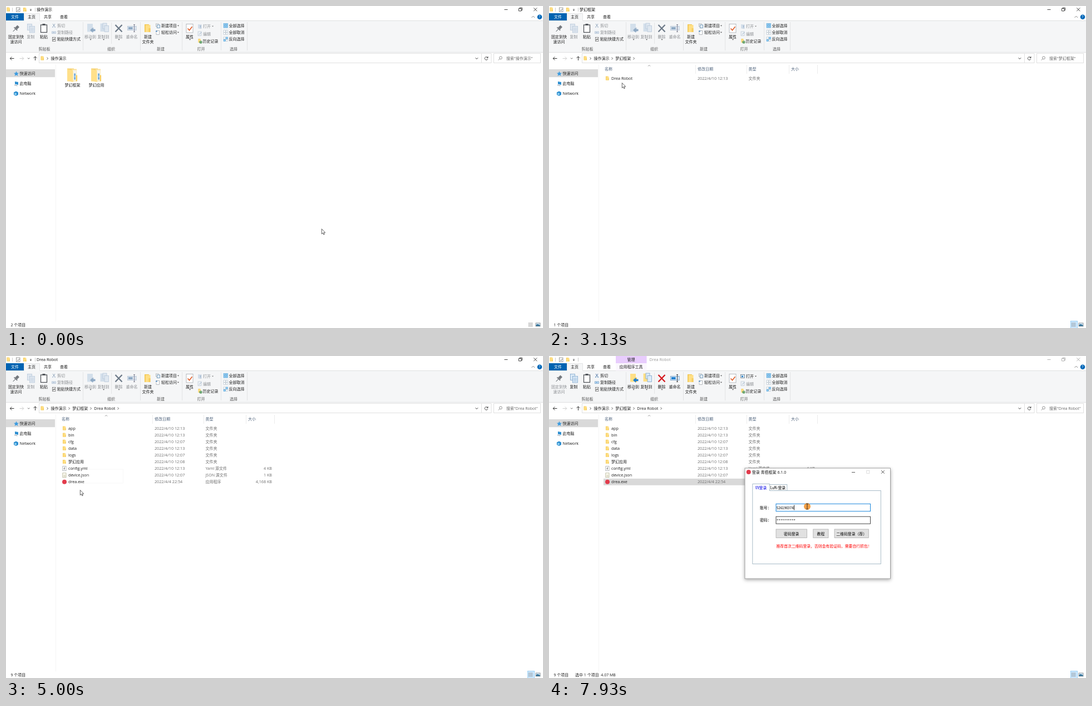
An HTML page that plays this animation: 965 px wide and 580 px high, repeating every 8000 ms.

```html
<!DOCTYPE html>
<html lang="en">
<head>
<meta charset="utf-8">
<title>File manager demo</title>
<style>
html, body { margin: 0; width: 100%; height: 100%; overflow: hidden; background: #fff; }
svg { display: block; width: 100%; height: 100%; }
text { font-family: "Open Sans", "Noto Sans CJK SC", "Noto Sans CJK", sans-serif; white-space: pre; }
.mono { font-family: "Noto Sans Mono CJK SC", "Noto Sans CJK SC", "Noto Sans CJK", monospace; }
</style>
</head>
<body>
<svg id="stage" viewBox="0 0 965 580" xmlns="http://www.w3.org/2000/svg"></svg>
<script>
const LOOP = 8000, STEP = 1000 / 15;
const INK = '#1e1e1e', DIM = '#8b8e92', GREY = '#6d6d6d', BLUE = '#2f7fc0';

// ---- drawing helpers ----
const text = (x, y, s, c = INK, anchor = 'start', size = /[\u4e00-\u9fff]/.test(s) ? 7 : 7.2, cls = '') =>
  `<text x="${x}" y="${y + 2.6}" fill="${c}" text-anchor="${anchor}" font-size="${size}" class="${cls}">${s}</text>`;
const mid = (x, y, s, c) => text(x, y, s, c, 'middle');
const mono = (x, y, s, c = '#000', anchor = 'start') => text(x, y, s, c, anchor, 6.85, 'mono');
const box = (x, y, w, h, fill, stroke = 'none', sw = 1) =>
  `<rect x="${x}" y="${y}" width="${w}" height="${h}" fill="${fill}" stroke="${stroke}" stroke-width="${sw}"/>`;
const line = (d, c, w = 1, fill = 'none') => `<path d="${d}" stroke="${c}" stroke-width="${w}" fill="${fill}"/>`;
const shape = (d, c) => `<path d="${d}" fill="${c}"/>`;
const dot = (x, y, r, c) => `<circle cx="${x}" cy="${y}" r="${r}" fill="${c}"/>`;
const down = (x, y, c = '#444') => shape(`M${x - 1.5} ${y - .8}h3l-1.5 1.8z`, c);
const chev = (x, y, c = '#444') => line(`M${x - 1} ${y - 2}l2 2l-2 2`, c, .9);
const folder = (x, y, w = 5.5, h = 7) =>
  box(x, y, w * .75, h, '#f2c54b') + box(x + w * .15, y + h * .08, w * .85, h * .92, '#ffdf85') +
  box(x + w * .7, y + h * .5, w * .3, h * .5, '#f5cd62');
const page = (x, y, w, h, c = '#9aa0a6', fill = '#fff') => box(x, y, w, h, fill, c, .7);

function bigFolder(x, y) {
  return shape(`M${x} ${y}h12v23h-12z`, '#f6d272') + shape(`M${x + 8} ${y + 1}h9v22h-9z`, '#fbe199') +
    box(x + 10, y + 3, 6.5, 19, '#f4f4ee') + box(x + 12.3, y + 9, 2.6, 11, '#6ba6d6') +
    box(x + 12.3, y + 13, 2.6, 3, '#a4cdea') + shape(`M${x} ${y + 1}l10.5 3v20.5l-10.5 -2z`, '#ffe08a') +
    box(x + 15.8, y + 12, 2.2, 11, '#f3ca5c');
}

// ---- ribbon: on = something selected, exe = application selected ----
function ribbon(on, exe) {
  const c = on ? INK : DIM, pin = exe ? DIM : INK;
  const pale = on ? '#dcebf8' : '#dfe7f0', edge = on ? '#6f9cc6' : '#b3c4d6', arrow = on ? '#1e7fd0' : '#8ea9c4';
  let s = '';
  // clipboard
  s += `<g transform="translate(18 40.5) rotate(45)">` + box(-2.5, -6, 5, 6, '#74797e') + box(-4, 0, 8, 1.8, '#74797e') +
    line('M0 1V7.5', '#74797e', 1) + '</g>';
  s += mid(18, 55.5, '固定到快', pin) + mid(18, 64.5, '速访问', pin);
  s += page(38.5, 32.5, 8, 11, edge, pale) + page(42.5, 36.5, 9, 11.5, edge, pale) +
    line('M44 40h6M44 42.5h6M44 45h6', edge, .6) + mid(44.5, 55.5, '复制', c);
  s += box(62.5, 34, 11, 13.5, '#fff', '#4f5358', 1.3) + box(65.5, 32, 5, 3, '#4f5358') + mid(68, 55.5, '粘贴');
  s += line('M84 32l3.5 5M88 32l-3.5 5', on ? '#4a6fa0' : '#8ba0b8', .9) + dot(84, 38, 1.1, edge) + dot(88, 38, 1.1, edge);
  s += text(92, 35.5, '剪切', c);
  s += box(82.5, 46, 7, 3.5, pale, edge, .8) + line('M84 47.7h3.5', arrow, .8) + text(92, 47.5, '复制路径', c);
  s += page(83.5, 56.5, 5.5, 7, '#555') + line('M85 62v-2.2h2.5M86.3 58.3l1.5 1.5l-1.5 1.5', '#333', .8) + text(92, 59.5, '粘贴快捷方式');
  // organise
  const fill = on ? '#ffdf85' : '#d3dfeb';
  s += box(146, 32, 10, 14.5, fill) + box(155, 39, 3, 8, on ? '#f2c54b' : '#c3d2e2');
  s += shape('M151 43.5l5-4.5v2.7h4.5v3.6h-4.5v2.7z', arrow) + mid(151.5, 55.5, '移动到', c) + down(152, 60.5);
  s += box(169.5, 31.5, 9, 14.5, fill) + page(174, 31, 7, 10, edge, pale) + page(177, 35.5, 7.5, 11, edge, pale) +
    mid(175, 55.5, '复制到', c) + down(175.5, 60.5);
  s += line('M196.5 34l12 12.5M208.5 34l-12 12.5', on ? '#d4161c' : '#6d7a88', 2.3) + mid(202.5, 55.5, '删除', c) + down(203, 60.5);
  s += box(218.5, 36.5, 15.5, 7, pale, edge, .9) + box(220, 38, 7.5, 4, arrow) +
    line('M229 33.5h3M230.5 33.5v13M229 46.5h3', on ? '#333' : '#778', .9) + mid(226, 55.5, '重命名', c);
  // new
  s += folder(249, 33, 10.5, 14) + mid(255, 55.5, '新建') + mid(255, 64.5, '文件夹');
  s += page(269.5, 32, 4.5, 5) + page(271.5, 34, 5, 5.5, '#4f7fa8', '#e5f0f8') + text(279, 35.5, '新建项目') + down(309.5, 35.5);
  s += page(270, 44.5, 5.5, 7) + line('M269 45.5h3', BLUE, 1.2) + text(279, 47.5, '轻松访问') + down(309.5, 47.5);
  // open
  s += page(324, 32.5, 12, 15.5) + line('M326.5 40.5l3 3.2l5-6.5', '#e0622f', 1.7) + mid(330, 55.5, '属性') + down(330.5, 60.5);
  s += exe ? box(344.5, 33.5, 7, 6, '#dff0fb', '#6a7b88', .8) + box(346, 35.5, 3, 2.6, BLUE)
    : box(345, 33, 2.5, 7.5, fill) + page(348, 34, 3, 6.5, edge, pale) + line('M349.5 39v-4', arrow, .9);
  s += text(354, 36.5, '打开', c) + down(371.5, 36.5, on ? '#444' : '#777');
  s += page(345, 46, 6, 7.5, '#b7c5d3', '#eef2f6') + line('M347 51.5l4.5-4.5', '#9fb2c6', 1) + text(354, 50, '编辑', DIM);
  s += folder(345.5, 59, 4.5, 7) + dot(350, 65, 2.6, '#5a9a5f') + line('M350 63.5v1.6h1.3', '#fff', .6) + text(353.5, 63, '历史记录');
  // select
  const grid = (y, cols) => cols.map((f, i) => box(391 + i % 2 * 4.2, y + (i >> 1) * 4.2, 3.4, 3.4, f, f === '#fff' ? '#a9b7c4' : '#58a6dc', .6)).join('');
  const a = '#8cc8ee', w = '#fff';
  s += grid(31.5, [a, a, a, a]) + grid(43.7, [w, w, w, w]) + grid(56, [w, a, a, w]);
  s += text(400.5, 35.5, '全部选择') + text(400.5, 47.5, '全部取消') + text(400.5, 59.5, '反向选择');
  if (exe) s += box(120, 0, 55.5, 13, '#e8ccfd') + box(120, 13, 55.5, 13.5, '#fbf7fe') + mid(147.5, 6.3, '管理') + mid(147.5, 19.7, '应用程序工具');
  return s;
}

function frame() {
  let s = box(0, 0, 965, 580, '#fff') + box(0, 27, 965, 56.5, '#f5f6f7');
  s += line('M0 26.5H32.5M60.5 26.5H965M0 83.5H965', '#dfe0e1') + line('M32.5 26.5V13.5H60.5V26.5', '#e4e5e6', 1, '#f5f6f7');
  s += folder(1.5, 2.5) + line('M11.5 3v7M52.5 3v7', '#b5b5b5', .7);
  s += page(18.5, 3, 6.5, 7.5, '#777') + line('M20 7l1.6 1.7l2.6-3.7', '#555', .8) + folder(31, 3) + line('M43 6h3', '#333', .7) + down(44.5, 8, '#333');
  s += box(0, 13, 32, 13, '#0063b1') + mid(16, 19.7, '文件', '#fff') + mid(46, 19.7, '主页') + mid(75, 19.7, '共享') + mid(104, 19.7, '查看');
  s += line('M944.5 21l2.8-2.8l2.8 2.8', '#666', .8) + dot(959, 19.7, 4.3, '#0067b8') + text(959, 19.7, '?', '#fff', 'middle', 6.5);
  s += line('M138.5 29v51M241.5 29v51M316.5 29v51M386.5 29v51M433.5 29v51M189.5 30v38', '#e3e4e5');
  [[69, '剪贴板'], [189, '组织'], [278, '新建'], [350.5, '打开'], [409, '选择']].forEach(([x, t]) => s += mid(x, 77.3, t, '#555'));
  // address bar
  s += line('M14.5 94.5h-7M10.3 91.5l-3 3l3 3', '#333', 1) + line('M24.5 94.5h7M28.8 91.5l3 3l-3 3', '#c9c9c9', .9);
  s += line('M39 93.5l1.7 1.7l1.7-1.7', '#555', .9) + line('M52.5 98v-7M49.6 93.8l2.9-2.9l2.9 2.9', '#333', 1);
  s += box(59.5, 85.5, 812.5, 17, '#fff', '#e0e0e0') + line('M854.5 86v16', '#e0e0e0') + box(876.5, 85.5, 84, 17, '#fff', '#e0e0e0');
  s += folder(62.5, 90.5) + chev(74.5, 94.5) + line('M843.7 93.3l2.2 2.2l2.2-2.2', '#333', 1);
  s += line('M865.6 93a2.8 2.8 0 1 0 .2 2.4M866 91v2.4h-2.4', '#333', .9);
  s += `<circle cx="889" cy="93.3" r="2.4" fill="none" stroke="#777" stroke-width=".8"/>` + line('M887.2 95.2l-2.4 2.4', '#777', .9);
  // navigation pane
  s += box(0, 114, 88, 14.2, '#d9d9d9') + line('M89.5 105v463', '#f5f5f5');
  s += shape('M18.5 117.5l1.3 2.9l3.2.3l-2.4 2.1l.8 3.2l-2.9-1.7l-2.9 1.7l.8-3.2l-2.4-2.1l3.2-.3z', '#3b9be0');
  s += shape('M16 136l6 1v5l-6-1.3z', '#2f8fd0') + line('M15 142.3l5.5 1.4', '#8a97a3', 1);
  s += shape('M14 155.5l4-2l4 2v4.5l-4 2l-4-2z', '#2f8fd0') + dot(17, 158.5, 2, '#8fd0f2');
  s += text(24.5, 121.5, '快速访问') + text(24.5, 139.7, '此电脑') + text(24.5, 157.7, 'Network');
  return s;
}
const viewIcons = () => [571, 573, 575, 577].map(y => line(`M939 ${y}h2.2M942 ${y}h1.8M944.5 ${y}h1.8`, '#777', .8)).join('') +
  box(952, 571, 8, 6, '#cfe6f7', '#777', .7) + shape('M952.4 576.6v-2l3-1.5l4.3 2v1.5z', '#2d6d93');

// ---- folder contents ----
const rowY = i => 130.2 + 12.08 * i;
const day = '2022/4/10 12:';
const FILES = [['app', day + '13'], ['bin', day + '13'], ['cfg', day + '07'], ['data', day + '13'], ['logs', day + '07'], ['梦幻应用', day + '08'],
  ['config.yml', day + '13', 'Yaml 源文件', '4 KB'], ['device.json', day + '07', 'JSON 源文件', '1 KB'], ['drea.exe', '2022/4/4 22:54', '应用程序', '4,168 KB']];

function fileIcon(name, y) {
  if (name.endsWith('.exe')) return dot(105, y, 4, '#e23b4c');
  if (name.endsWith('.yml')) return page(101.8, y - 4, 6.2, 8) + line(`M106 ${y - 2}q-1.3-.4-1.3 1v3.2M103.8 ${y}h2`, '#555', .7);
  if (name.endsWith('.json')) return page(101.8, y - 4, 6.2, 8, '#aaa88a', '#fbfaf0') + line(`M103.3 ${y}h3.5M103.3 ${y + 2}h3.5`, '#b5b48f', .7);
  return folder(102, y - 3.6);
}
function details(files) {
  const hc = '#4c607a';
  let s = line('M263.5 106v16M355.5 106v16M431.5 106v16M482.5 106v16', '#ececec') + line('M177.8 108.5l2.2-2l2.2 2', '#777', .7);
  s += text(100, 113.5, '名称', hc) + text(267, 113.5, '修改日期', hc) + text(358.5, 113.5, '类型', hc) + text(435, 113.5, '大小', hc);
  files.forEach(([name, date, type = '文件夹', size = ''], i) => {
    const y = rowY(i);
    s += fileIcon(name, y) + text(112, y, name) + text(267, y, date, GREY) + text(358.5, y, type, GREY) + text(478, y, size, GREY, 'end');
  });
  return s;
}
const VIEWS = [
  { title: '操作演示', count: 2, body: bigFolder(110, 112.5) + bigFolder(153, 112.5) + mid(119.5, 142, '梦幻框架') + mid(162.5, 142, '梦幻应用') },
  { title: '梦幻框架', count: 1, body: details([['Drea Robot', day + '13']]) },
  { title: 'Drea Robot', count: 9, body: details(FILES) }
];
const CRUMBS = [80.5, 119.3, 158.3], CHEVS = [113.5, 152.5, 201.5];
const crumbs = n => VIEWS.slice(0, n + 1).map((v, i) => text(CRUMBS[i], 94.3, v.title) + (i < n ? chev(CHEVS[i], 94.5) : '')).join('') +
  text(899, 94.3, `搜索"${VIEWS[n].title}"`, '#666');

function dialog() {
  let s = `<rect x="352" y="202" width="261.5" height="199" fill="#fff" stroke="#8a8a8a" stroke-width=".8" filter="url(#shade)"/>`;
  s += dot(358.7, 209, 4, '#e23b4c') + text(364.8, 209, '登录 青梧框架 6.1.0', '#111');
  s += line('M544 209.5h6', '#333', .8) + box(570.8, 206.3, 5, 5, 'none', '#ccc', .7) + line('M597 206l5.8 5.8M602.8 206l-5.8 5.8', '#333', .8);
  s += box(365.8, 242.5, 230.5, 132, '#fff', '#9fb4c2', .9) + box(396.5, 231.5, 31.3, 11, '#fff', '#9fb4c2', .9);
  s += line('M365.8 243V230.3H396.5V243', '#9fb4c2', .9, '#fff') + line('M366.3 242.6H396', '#fff', 1.4);
  s += mono(381, 237, 'VV登录', '#0000e6', 'middle') + mono(411.5, 237.2, 'LuMi登录', '#000', 'middle');
  s += mono(379, 273, '账号：') + mono(379, 295.8, '密码：');
  s += box(408, 266.3, 169.5, 13.4, '#fff', '#0078d7', .9) + `<g id="pass">${box(408, 289.2, 169.5, 13, '#fff')}</g>`;
  s += mono(408.8, 273, '526190374') + mono(408.8, 296, '**********');
  [[408, 55.5, '密码登录'], [474.8, 27.2, '教程'], [513, 61.3, '二维码登录（荐）']].forEach(([x, w, t]) =>
    s += box(x, 312, w, 15.5, '#e1e1e1', '#adadad', .8) + mono(x + w / 2, 320.3, t, '#000', 'middle'));
  return s + mono(408.5, 342.5, '推荐首次二维码登录，否则会有验证码，需要自行抓包!', '#f00');
}

// ---- build ----
const group = (id, s) => `<g id="${id}">${s}</g>`;
const stage = document.getElementById('stage');
stage.innerHTML = '<defs><filter id="shade" x="-10%" y="-10%" width="120%" height="125%"><feDropShadow dx="0" dy="2" stdDeviation="3" flood-opacity=".35"/></filter></defs>' +
  frame() + group('rib0', ribbon(false, false)) + group('rib1', ribbon(true, false)) + group('rib2', ribbon(true, true)) +
  group('controls', line('M895.5 6.5h6M921.5 4.5h4.5v4.5h-4.5zM923 4.5v-1.3h4.5v4.5h-1.5M948.3 3.3l6 6M954.3 3.3l-6 6', 'currentColor', .9)) +
  group('title', text(0, 6.5, '')) + group('status', text(8.5, 574.2, '')) + group('picked', text(47, 574.2, '')) +
  group('listOn', box(937.5, 567.5, 12, 13, '#cce8ff', '#8cc6ee', .8)) + viewIcons() +
  '<rect id="hover"/><rect id="sel"/>' +
  VIEWS.map((v, i) => group('view' + i, v.body + crumbs(i))).join('') + group('tail', chev(0, 94.5)) +
  group('tip', box(135, 204, 75.5, 25, '#fff', '#888', .8)) +
  group('dialog', dialog() + '<rect id="caret" y="268.5" width=".9" height="9" fill="#000"/>') +
  '<circle id="ring" fill="#ef8718"/>' +
  group('arrow', line('M.3 .5V9.6L2.4 7.7L3.8 10.9L5.3 10.2L3.9 7.2H6.7Z', '#222', .7, '#fff')) +
  group('beam', line('M-2-5h1.5l.5 .5l.5-.5h1.5M0-4.5v9M-2 5h1.5l.5-.5l.5 .5h1.5', '#222', .9));
const el = {};
stage.querySelectorAll('[id]').forEach(e => el[e.id] = e);

// ---- timeline, in steps of 1/15 s ----
const PATH = [[0, 567, 401], [9, 567, 401], [22, 114, 149], [25, 114, 123], [35, 114, 123], [41, 129, 148], [47, 131, 138], [50, 133, 132],
  [62, 133, 132], [66, 133, 164], [69, 133, 187], [72, 133, 187], [75, 133, 241], [79, 133, 254], [80, 133, 254], [86, 133, 227], [94, 133, 227],
  [99, 183, 267], [102, 183, 267], [106, 300, 92], [111, 468, 316], [115, 464, 271], [120, 464, 271]];
const CLICKS = [28, 31, 52, 55, 88, 91, 116];
const NAV = [0, 34, 58], PICK = [28, 52, 88], OPEN = 95;

function cursorAt(f) {
  let i = 1;
  while (i < PATH.length - 1 && PATH[i][0] < f) i++;
  const [f0, x0, y0] = PATH[i - 1], [f1, x1, y1] = PATH[i];
  const p = Math.min(1, (f - f0) / (f1 - f0)), e = (1 - Math.cos(Math.PI * p)) / 2;
  return [x0 + (x1 - x0) * e, y0 + (y1 - y0) * e];
}
const show = (e, on) => e.setAttribute('display', on ? 'inline' : 'none');
const set = (e, o) => { for (const k in o) e.setAttribute(k, o[k]); };
const write = (e, s) => { if (e.firstChild.textContent !== s) e.firstChild.textContent = s; };
const cell = (view, i) => view === 0 ? { x: 98, y: 109, width: 42.5, height: 39.5 } : { x: 98, y: rowY(i) - 6, width: 382.5, height: 12 };

function draw(t) {
  const f = Math.floor((t + 4) / STEP);
  const [x, y] = cursorAt(f);
  const view = f >= NAV[2] ? 2 : f >= NAV[1] ? 1 : 0;
  const picked = f >= PICK[view], open = f >= OPEN, exe = picked && view === 2;

  [0, 1, 2].forEach(i => {
    show(el['view' + i], i === view);
    show(el['rib' + i], i === (exe ? 2 : picked ? 1 : 0));
  });
  write(el.title, VIEWS[view].title);
  set(el.title, { transform: `translate(${exe ? 180.5 : 55} 0)` });
  set(el.title.firstChild, { fill: open ? '#999' : '#111', 'font-size': view === 2 ? 7.2 : 7 });
  el.controls.style.color = open ? '#aaa' : '#333';
  write(el.status, VIEWS[view].count + ' 个项目');
  write(el.picked, picked ? '选中 1 个项目' + (exe ? '  4.07 MB' : '') : '');
  set(el.status.firstChild, { 'font-size': 7 });
  set(el.picked.firstChild, { 'font-size': 7 });
  show(el.listOn, view > 0);
  show(el.tail, view > 0 && f >= NAV[view] + 4);
  set(el.tail, { transform: `translate(${CHEVS[view]} 0)` });

  // hover and selection
  const pick = view === 2 ? 8 : 0;
  const row = view === 0 ? 0 : Math.floor((y - rowY(0) + 6) / 12.08);
  const inside = view === 0 ? x > 98 && x < 141 && y > 109 && y <= 149.5 : x > 98 && x < 480 && row >= 0 && row < VIEWS[view].count;
  show(el.hover, inside && !open && !(picked && row === pick));
  set(el.hover, { ...cell(view, row), fill: '#e5f3ff' });
  show(el.sel, picked);
  set(el.sel, { ...cell(view, pick), fill: open ? '#d9d9d9' : '#cce8ff' });
  show(el.tip, f >= 74 && f <= 75);
  set(el.tip, { opacity: .07 });

  // login window
  show(el.dialog, open);
  set(el.dialog, { opacity: Math.min(1, (f - OPEN + 1) * .4) });
  set(el.pass.firstChild, { stroke: f >= 111 ? '#333' : '#8a8a8a', 'stroke-width': .9 });
  set(el.caret, { x: f >= 117 ? 440 : 409.5 });

  // pointer
  const click = CLICKS.filter(c => c <= f).pop(), age = f - click;
  show(el.ring, age >= 0 && age < 10);
  if (age >= 0) {
    const [cx, cy] = cursorAt(click);
    set(el.ring, { cx, cy, r: 3 + Math.min(age, 7), opacity: Math.max(0, 1.1 - age * .1).toFixed(2) });
  }
  const typing = open && x > 408 && x < 577 && (y > 266 && y < 280 || y > 289 && y < 302);
  show(el.arrow, !typing);
  show(el.beam, typing);
  set(typing ? el.beam : el.arrow, { transform: `translate(${x.toFixed(1)} ${y.toFixed(1)})` });
}

const start = performance.now();
function tick() {
  draw((performance.now() - start) % LOOP);
  requestAnimationFrame(tick);
}
tick();
</script>
</body>
</html>
```
